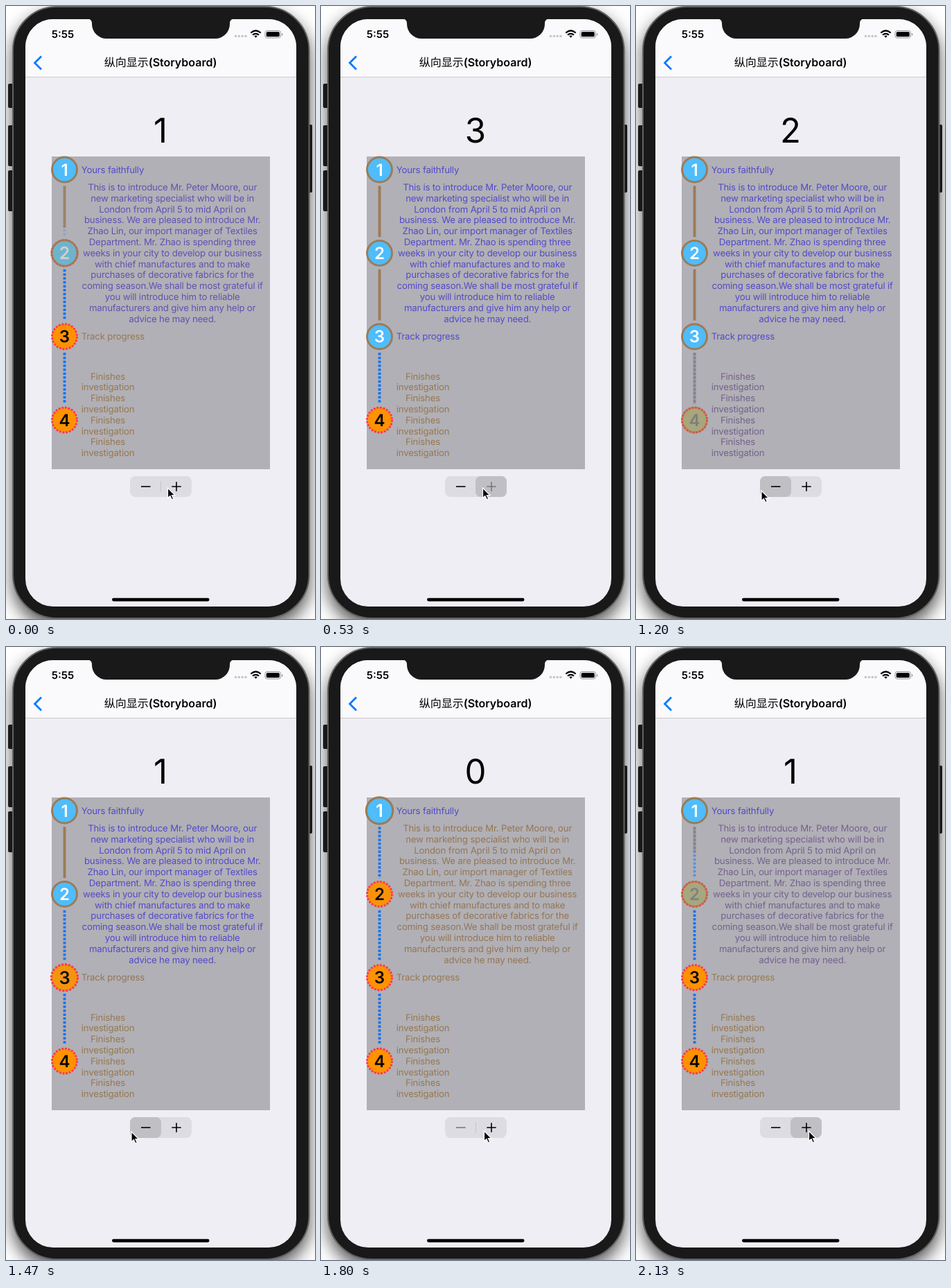
Write an HTML page that moves like this. It is 446 px wide and 884 px high and loops after 2.19 s.

```html
<!DOCTYPE html>
<html lang="en">
<head>
<meta charset="utf-8">
<title>Step progress</title>
<style>
html, body { margin: 0; width: 100%; height: 100%; overflow: hidden; background: #fff; }
svg { display: block; font-family: Inter, "Noto Sans CJK SC", "Noto Sans CJK", sans-serif; text-rendering: geometricPrecision; }
.mid { text-anchor: middle; }
.copy { font-size: 13.2px; letter-spacing: -.17px; }
.num { font-size: 24px; font-weight: 600; text-anchor: middle; }
.bold { font-weight: 600; }
.line { fill: none; stroke-width: 3.8; }
.key { stroke: #000; stroke-width: 1.6; fill: none; }
</style>
</head>
<body>
<svg id="stage" width="446" height="884" viewBox="0 0 446 884">
  <!-- phone -->
  <g fill="#222">
    <rect x="3" y="112" width="9" height="35" rx="2"/>
    <rect x="3" y="172" width="9" height="59" rx="2"/>
    <rect x="3" y="237" width="9" height="59" rx="2"/>
    <rect x="434" y="171" width="8" height="98" rx="2"/>
  </g>
  <rect x="10" y="1" width="427.5" height="882" rx="63" fill="#191919" stroke="#626464" stroke-width="2" style="filter:drop-shadow(0 11px 12px #000a)"/>
  <clipPath id="screen"><rect x="28" y="19" width="391" height="847" rx="40"/></clipPath>
  <g clip-path="url(#screen)">
    <rect x="28" y="19" width="391" height="847" fill="#efeef4"/>
    <rect x="28" y="19" width="391" height="83" fill="#fafafc"/>
    <path d="M28 102.5H419" stroke="#c9c9cd"/>
  </g>
  <path d="M118 18.5Q124 19 124 25V26A21 21 0 0 0 145 47H302A21 21 0 0 0 323 26V25Q323 19 329 18.5Z" fill="#191919"/>

  <!-- status and navigation bars -->
  <text class="mid bold" x="82" y="46" font-size="15">5:55</text>
  <g fill="#c6c6ca">
    <circle cx="331.5" cy="43.5" r="1.8"/><circle cx="336.4" cy="43.5" r="1.8"/>
    <circle cx="341.2" cy="43.5" r="1.8"/><circle cx="346" cy="43.5" r="1.8"/>
  </g>
  <g fill="none" stroke="#000" stroke-width="2.2">
    <path d="M353.3 38.8Q360.5 32.2 367.7 38.8M356 41.8Q360.5 37.8 365 41.8"/>
    <path d="M358.3 43.4Q360.5 41.6 362.7 43.4L360.5 45.8Z" fill="#000" stroke="none"/>
  </g>
  <rect x="374" y="35.5" width="22.5" height="10.5" rx="3" fill="none" stroke="#96969a"/>
  <rect x="375.7" y="37.2" width="19.1" height="7.1" rx="1.6"/>
  <path d="M398 39V43Q399.5 42.5 399.5 41T398 39Z" fill="#96969a"/>
  <path d="M51 72.5L41.5 82L51 91.5" fill="none" stroke="#0a7aff" stroke-width="2.8"/>
  <text class="mid bold" x="223" y="87" font-size="16"><tspan font-weight="500">纵向显示</tspan>(Storyboard)</text>

  <!-- content -->
  <text id="count" class="mid" x="223" y="196.5" font-size="49"></text>
  <rect x="66" y="217" width="315" height="451" fill="#b1b0b6"/>
  <g id="steps"></g>

  <!-- stepper -->
  <rect x="179" y="678" width="89" height="30" rx="8" fill="#dddce3"/>
  <path d="M223.5 685V701" stroke="#c6c5cb"/>
  <rect id="press" y="678" width="45" height="30" rx="7.5" fill="#c0bfc4"/>
  <path id="minus" class="key" d="M195 693H208.5"/>
  <path id="plus" class="key" d="M239.3 693H252.7M246 686.3V699.7"/>

  <rect x="153" y="853.8" width="140.5" height="4.6" rx="2.3"/>
  <path id="cursor" d="M0 0V14.5L3.4 11.4L5.8 16.8L8.2 15.8L5.9 10.6H10.4Z" stroke="#fff" stroke-width="1.2"/>
</svg>
<script>
const LOOP = 2190;
const FADE = 280;
// start time, new value
const TAPS = [[111, 2], [530, 3], [1060, 2], [1235, 1], [1555, 0], [1990, 1]];
// time, x, y
const CURSOR = [[0, 233.5, 695], [760, 233.5, 695], [1040, 181, 699], [1610, 181, 699],
  [1790, 235.5, 698], [1850, 235.5, 698], [1980, 249.5, 698], [LOOP, 249.5, 698]];
const INDIGO = [82, 74, 201], BROWN = [150, 120, 80];
const X = 84.5, TOP = 236, GAP = 120.35, ROW = 15.8;
const LETTER = `This is to introduce Mr. Peter Moore, our
new marketing specialist who will be in
London from April 5 to mid April on
business. We are pleased to introduce Mr.
Zhao Lin, our import manager of Textiles
Department. Mr. Zhao is spending three
weeks in your city to develop our business
with chief manufactures and to make
purchases of decorative fabrics for the
coming season.We shall be most grateful if
you will introduce him to reliable
manufacturers and give him any help or
advice he may need.`;

const $ = id => document.getElementById(id);
const mix = (a, b, k) => a + (b - a) * k;
const ease = p => .5 - .5 * Math.cos(Math.PI * Math.min(1, Math.max(0, p)));

function add(parent, tag, attrs, text = '') {
  const el = document.createElementNS('http://www.w3.org/2000/svg', tag);
  for (const name in attrs) el.setAttribute(name, attrs[name]);
  el.textContent = text;
  return parent.appendChild(el);
}

function addRows(parent, rows, x, y, align = '') {
  rows.forEach((row, i) => add(parent, 'text', { class: `copy ${align}`, x, y: y + i * ROW }, row));
}

function addDot(parent, label, color, ring) {
  const dot = add(parent, 'g', {});
  add(dot, 'circle', { r: 18, 'stroke-width': 2.9, ...ring });
  add(dot, 'text', { class: 'num', y: 8.7, fill: color }, label);
  return dot;
}

const steps = [0, 1, 2, 3].map(i => {
  const root = $('steps'), y = TOP + i * GAP;
  const step = { y, end: y - 23.2, start: y - GAP + 23.4 };
  if (i) {
    const d = `M${X} ${step.start}V${step.end}`;
    step.dots = add(root, 'path', { class: 'line', d, stroke: '#0c73f6', 'stroke-dasharray': '3.5 2.17' });
    step.solid = add(root, 'path', { class: 'line', stroke: '#9c7b55' });
  }
  step.badge = add(root, 'g', {});
  step.off = addDot(step.badge, i + 1, '#000',
    { fill: '#ff9200', stroke: '#ff3650', 'stroke-dasharray': '2.85 1.86' });
  step.on = addDot(step.badge, i + 1, '#fff', { fill: '#4fbcfb', stroke: '#9c7b55' });
  step.text = add(root, 'g', {});
  return step;
});
addRows(steps[0].text, ['Yours faithfully'], 108.7, 240.7);
addRows(steps[1].text, LETTER.split('\n'), 240.2, 266, 'mid');
addRows(steps[2].text, ['Track progress'], 108.7, 481.2);
addRows(steps[3].text, Array.from({ length: 8 }, (_, i) => i % 2 ? 'investigation' : 'Finishes'), 147, 538.5, 'mid');

function drawStep(step, level, grow, bump) {
  const rgb = INDIGO.map((c, j) => Math.round(mix(BROWN[j], c, level)));
  step.text.setAttribute('fill', `rgb(${rgb})`);
  step.on.setAttribute('opacity', level);
  step.off.setAttribute('opacity', level < 1 ? 1 : 0);
  step.badge.setAttribute('transform', `translate(${X} ${step.y}) scale(${1 + .065 * bump})`);
  if (!step.solid) return;
  step.dots.setAttribute('opacity', 1 - level);
  step.solid.setAttribute('opacity', level);
  step.solid.setAttribute('d', `M${X} ${step.start}V${mix(step.start, step.end, grow)}`);
}

function drawCursor(t) {
  const n = CURSOR.findIndex(key => key[0] > t);
  const [t0, x0, y0] = CURSOR[n - 1], [t1, x1, y1] = CURSOR[n];
  const k = ease((t - t0) / (t1 - t0));
  $('cursor').setAttribute('transform', `translate(${mix(x0, x1, k)} ${mix(y0, y1, k)})`);
}

function draw(t) {
  const n = (TAPS.filter(tap => tap[0] <= t).length + TAPS.length - 1) % TAPS.length;
  const [start, value] = TAPS[n];
  const before = TAPS[(n + TAPS.length - 1) % TAPS.length][1];
  const age = (t - start + LOOP) % LOOP;
  const up = value > before, changed = Math.max(value, before);
  const fade = ease(age / FADE);
  const pulse = age > 175 && age < 335 ? Math.sin(Math.PI * (age - 175) / 160) : 0;
  const pulsed = value ? changed : 0;

  steps.forEach((step, i) => {
    const moving = i === changed;
    const level = moving ? (up ? fade : 1 - fade) : +(i <= value);
    drawStep(step, level, moving && up ? fade : 1, i === pulsed ? pulse : 0);
  });
  $('count').textContent = value;
  $('press').setAttribute('x', up ? 223 : 179);
  $('press').setAttribute('opacity', age < (up ? 190 : 245) ? 1 : 0);
  $('minus').style.stroke = value > 0 ? '#000' : '#77777b';
  $('plus').style.stroke = value < 3 ? '#000' : '#77777b';
  drawCursor(t);
}

const begin = performance.now();
function tick() {
  draw((performance.now() - begin) % LOOP);
  requestAnimationFrame(tick);
}
tick();
</script>
</body>
</html>
```
